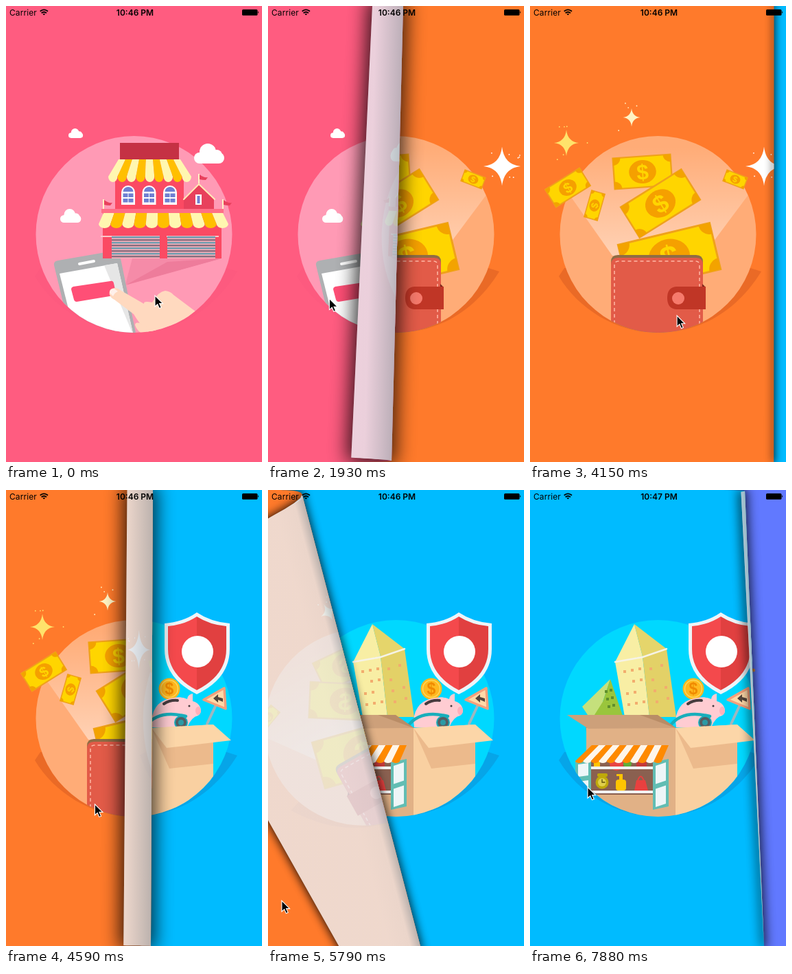
Animation of 373 by 663 pixels, one loop 8000 ms. Source, as an HTML page:

```html
<!DOCTYPE html>
<html lang="en">
<head>
<meta charset="utf-8">
<title>Page curl</title>
<style>
  html, body { margin: 0; width: 100%; height: 100%; overflow: hidden; }
  svg { display: block; width: 100vw; height: 100vh; }
  text { font-family: Inter, "Liberation Sans", sans-serif; }
  .coin { font-family: "Liberation Sans", sans-serif; font-weight: 700; text-anchor: middle; }
</style>
</head>
<body>
<svg viewBox="0 0 373 663">
  <defs>
    <clipPath id="disc"><circle cx="186.5" cy="332" r="143"/></clipPath>
    <clipPath id="frontClip"><polygon id="front"/></clipPath>
    <clipPath id="backClip"><polygon id="back"/></clipPath>
    <linearGradient id="beam" x1="0" y1="362" x2="0" y2="205" gradientUnits="userSpaceOnUse">
      <stop stop-color="#fff" stop-opacity=".45"/><stop offset="1" stop-color="#fff" stop-opacity="0"/>
    </linearGradient>
    <linearGradient id="shade" gradientUnits="userSpaceOnUse">
      <stop stop-color="#707a80" stop-opacity=".42"/>
      <stop offset=".16" stop-color="#707a80" stop-opacity=".24"/>
      <stop offset=".33" stop-color="#707a80" stop-opacity=".06"/>
      <stop offset="1" stop-color="#707a80" stop-opacity=".03"/>
    </linearGradient>
    <g id="art"></g>
  </defs>
  <rect id="nextBg" width="373" height="663"/>
  <use id="nextArt"/>
  <polygon id="castRight" opacity=".75" stroke="#000"/>
  <g clip-path="url(#frontClip)">
    <rect id="bg" width="373" height="663"/>
    <use id="pageArt"/>
    <polygon id="castLeft" opacity=".8" stroke="#000"/>
  </g>
  <g clip-path="url(#backClip)">
    <rect width="373" height="663" fill="#f1f4f9"/>
    <g opacity=".2">
      <rect id="mirrorBg" width="373" height="663"/>
      <use id="mirror"/>
    </g>
    <rect width="373" height="663" fill="url(#shade)"/>
  </g>
  <g id="status">
    <text x="5" y="13.6" font-size="12" letter-spacing=".1">Carrier</text>
    <text id="clock" x="188" y="13.6" font-size="12" font-weight="600" text-anchor="middle"></text>
    <g fill="none" stroke="#000" stroke-width="1.8">
      <path d="M49.7 7.8Q55.3 3 61 7.8M51.7 10.2Q55.3 7.2 59 10.2"/>
      <path d="M55.3 13.6L53.4 11.6Q55.3 10.2 57.2 11.6Z" fill="#000" stroke="none"/>
    </g>
    <rect x="344" y="5" width="22.5" height="8.8" rx="1.6"/>
    <path d="M367.2 7.6q2 1.7 0 3.4z"/>
  </g>
  <path id="cursor" d="M0 0V16L3.8 12.6L6.4 18.6L9.2 17.4L6.6 11.6H11.6Z" stroke="#fff" stroke-width="1.1"/>
</svg>
<script>
const W = 373, H = 663, LOOP = 8000, TICK = 148.3;
const $ = id => document.getElementById(id);
const repeat = (n, fn) => Array.from({ length: n }, (_, i) => fn(i)).join('');
const poly = (fill, points) => `<polygon fill="${fill}" points="${points}"/>`;
const rect = (fill, x, y, w, h, r = 0) =>
  `<rect fill="${fill}" x="${x}" y="${y}" width="${w}" height="${h}" rx="${r}"/>`;
const dot = (fill, x, y, r) => `<circle fill="${fill}" cx="${x}" cy="${y}" r="${r}"/>`;
const path = (fill, d) => `<path fill="${fill}" d="${d}"/>`;
const line = (color, width, d) =>
  `<path fill="none" stroke="${color}" stroke-width="${width}" stroke-linecap="round" d="${d}"/>`;
const inDisc = s => `<g clip-path="url(#disc)">${s}</g>`;
const dollar = (fill, x, y, size) =>
  `<text class="coin" fill="${fill}" x="${x}" y="${y + size * .36}" font-size="${size}">$</text>`;

let seed = 7;
const random = () => (seed = seed * 16807 % 2147483647) / 2147483647;

const base = (fill, shadow, alpha) =>
  `<path fill="${shadow}" opacity="${alpha}" d="M50 381L42 393C70 440 125 475 186 475C245 475 300 446 337 386L318 380Z"/>`
  + dot(fill, 186.5, 332, 143);

const cloud = (x, y, k) => `<g fill="#fff" transform="translate(${x} ${y}) scale(${k})">
  <rect y="13" width="44" height="16" rx="8"/><circle cx="20" cy="12" r="12"/><circle cx="33" cy="17" r="8"/></g>`;

// Striped awning: top and bottom are [left, right, y]
function awning(n, top, bottom, drop, colors) {
  const x = (e, i) => e[0] + (e[1] - e[0]) * i / n;
  const w = (bottom[1] - bottom[0]) / n;
  return repeat(n, i => path(colors[i % 2], `M${x(top, i)} ${top[2]}L${x(top, i + 1)} ${top[2]}
    L${x(bottom, i + 1)} ${bottom[2]}a${w / 2} ${drop} 0 0 1 ${-w} 0z`));
}

const flag = (x, y) => rect('#fff3c4', x - 1, y, 2, 14)
  + path('#e8415c', `M${x + 1} ${y + 1}q6 5 12 4l-3 4q-6 0 -9 -1z`);

const archWindow = x => path('#fff', `M${x} 289V271a10 10 0 0 1 20 0V289z`)
  + path('#6f7fd2', `M${x + 2.5} 270a7.5 7 0 0 1 15 0z`)
  + repeat(4, i => rect('#6f7fd2', x + 2.5 + i % 2 * 8, 272.5 + (i >> 1) * 7.5, 7, 5.5));

const shutter = x => rect('#fbb3bd', x, 334, 70, 33)
  + repeat(8, i => rect(i % 2 ? '#8a6f80' : '#6f9db0', x, 335 + i * 4, 70, 2.5));

const YELLOW = ['#fff7b0', '#ffbf00'];

const store = rect('#c53144', 166, 199, 86, 25)
  + rect('#fb4a63', 159, 245, 100, 50)
  + repeat(3, i => archWindow(168 + i * 30.5))
  + awning(9, [164, 254, 223], [149, 270, 248], 8, YELLOW)
  + flag(281, 244) + poly('#e8415c', '259,295 259,280 281,258 303,280 303,295')
  + line('#ffe9b8', 2.2, 'M259 281L281 259L304 281')
  + rect('#fff', 276, 274, 9, 15) + rect('#6f7fd2', 278.5, 276, 4, 11)
  + flag(142, 281) + flag(316, 281)
  + rect('#fb4a63', 141, 300, 173, 67) + rect('#ff6f86', 139, 295, 178, 6)
  + rect('#fbc7cb', 138, 334, 172, 2) + shutter(154) + shutter(235)
  + rect('#fb4a63', 224, 333, 10, 34)
  + awning(11, [142, 316, 301], [135, 324, 317], 6, YELLOW);

const phone = poly('#f58ba8', '174,405 184,367 314,367') + poly('#ee7c9b', '174,406 235,372 314,367')
  + path('#aeb0b2', 'M70 377Q69 371 76 370L157 356Q164 355 166 362L190 480H95Z')
  + poly('#fff', '78,389 162,374 186,480 101,480')
  + poly('#e6e6e6', '143,377 162,374 186,480')
  + line('#fff', 4, 'M107 375L128 371')
  + path('#ff4f76', 'M95 412Q95 409 98 408L152 400Q156 399 157 403L160 417Q160 420 157 421L103 430Q100 430 99 427Z');

const hand = path('#ffd9bf', `M151 420Q149 411 158 410Q163 410 168 414L201 433Q200 428 213 431
  Q222 415 232 414Q240 415 244 420L276 444L260 480H212Q196 465 186 448L158 427Q153 425 151 420Z`)
  + path('#ffd9bf', 'M188 464Q188 459 195 461L226 474L210 482Q192 476 188 464Z')
  + path('#fff0ea', 'M151 417Q151 410 158 411L163 415Q158 417 156 422Z');

const shopPage = base('#ff9ab5', '#e84a70', .12) + cloud(91, 178, .48) + cloud(79, 295, .69)
  + inDisc(phone + hand) + store + cloud(274, 200, 1);

function bill(x, y, w, h, turn) {
  const q = h * .24;
  const corner = i => `<path fill="#f3a300" transform="scale(${i & 1 ? 1 : -1} ${i & 2 ? 1 : -1})"
    d="M${w / 2} ${h / 2}h${-q}a${q} ${q} 0 0 1 ${q} ${-q}z"/>`;
  return `<g transform="translate(${x} ${y}) rotate(${turn})">
    <rect x="${-w / 2}" y="${-h / 2}" width="${w}" height="${h}" fill="#ffd500" stroke="#efa21a" stroke-width="${1 + h / 35}"/>
    ${repeat(4, corner)}<ellipse rx="${h * .44}" ry="${h * .38}" fill="#f5a000"/>${dollar('#ffd500', 0, 0, h * .7)}</g>`;
}

// Four-pointed star with loose specks around it
const spark = (fill, x, y, r, specks) => `<path fill="${fill}" transform="translate(${x} ${y}) scale(${r})"
  d="M0-1.06Q.1-.1 1 0Q.1.1 0 1.06Q-.1.1-1 0Q-.1-.1 0-1.06Z"/>`
  + repeat(specks, () => {
    const angle = random() * 2 * Math.PI, d = 14 + random() * 18;
    return dot(fill, x + d * Math.cos(angle), y + d * Math.sin(angle), .9);
  });

const wallet = path('#8f6d45', 'M118 372Q118 362 128 362H242Q252 362 252 372V480H118Z')
  + path('#e25b48', 'M118 376Q118 366 128 366H242Q252 366 252 376V480H118Z')
  + '<path fill="none" stroke="#ffb9a6" stroke-width="1.5" stroke-dasharray="5 4" d="M123 480V377Q123 371 129 371H241Q247 371 247 377V480"/>'
  + poly('#7d2218', '251,404 256,409 251,409')
  + path('#c03626', 'M256 408H213Q200 409 200 424.5T213 441H256Z') + dot('#f67a6c', 216, 425, 9);

const moneyPage = base('#ffac77', '#ea6a26', 1)
  + inDisc(path('url(#beam)', 'M120 363L60 278L75 190H300L320 272L252 363Z'))
  + bill(164, 241, 84, 45, -4) + bill(190, 287, 104, 52, -32)
  + bill(203, 365, 137, 69, -13.5) + bill(55, 264, 59, 30, -32)
  + bill(94, 290, 40, 20, -74) + bill(299, 252, 32, 17, 21)
  + inDisc(wallet)
  + spark('#ffe36b', 53, 199, 18, 6) + spark('#fff3c4', 148, 162, 12.5, 4) + spark('#fff', 341, 233, 27, 8);

// Tower windows climb with the slant of their wall
const panes = (cols, x, y, dx, slant, lean) => repeat(cols * 4, i => {
  const c = i % cols, r = i / cols | 0;
  return i % 5 === 3 ? '' : rect('#f2ad6e', x + c * dx + r * lean, y + r * 16 - c * slant, 4, 4);
});

const towers = poly('#f8eea4', '152,195 124,250 164,242') + poly('#e5d56b', '152,195 164,242 199,231')
  + poly('#f8eea4', '124,250 164,242 174,330 138,330') + poly('#e3d167', '164,242 199,231 213,330 174,330')
  + line('#f6f3e6', 2.5, 'M124 250L164 243L199 231')
  + panes(3, 136, 262, 11, 2, 2) + panes(2, 174, 258, 16, 5, 3)
  + poly('#c5e07c', '76,315 117,275 106,308 108,330 86,330') + poly('#9ac53c', '117,275 135,328 92,330 106,308')
  + repeat(6, i => rect('#5f8f2c', 109 + i % 2 * 7 + (i >> 1) * 2, 291 + (i >> 1) * 11 - i % 2 * 2, 4, 4));

const pig = dot('#ffb81f', 238, 289, 15.5)
  + '<circle cx="238" cy="289" r="12.5" fill="none" stroke="#ffd75a" stroke-width="1.5"/>'
  + dollar('#f08a00', 238, 289, 23)
  + path('#ffccd2', 'M212 335Q215 305 245 302Q256 300 264 304Q265 297 272 296L272 307Q280 309 283 316Q286 323 280 328Q270 330 264 345H213Z')
  + line('#473b3f', 4, 'M230 311Q239 305 250 306') + dot('#473b3f', 267, 314, 1.5)
  + '<ellipse cx="280" cy="321" rx="4" ry="6" fill="#ffb0ba"/>'
  + line('#18aebb', 4.5, 'M204 343Q222 319 262 329')
  + dot('#18aebb', 255, 338, 10) + dot('#555e63', 255, 338, 8) + dot('#2c9aa5', 255, 338, 4);

const sign = line('#9db7c0', 4, 'M308 308L293 340')
  + '<path fill="#ffd9a8" stroke="#f3a07c" stroke-width="3.5" stroke-linejoin="round" d="M288 305L318 288L320 318Z"/>'
  + path('#55463c', 'M302 303L309 297V301L316 303V308L309 305V309Z');

const shield = path('#eef4f8', 'M278 178Q299 192 326 194V231Q326 274 278 297Q231 274 231 231V194Q258 192 278 178Z')
  + path('#f4494c', 'M278 184V291Q236 269 236 231V198Q260 196 278 184Z')
  + path('#e14040', 'M278 184Q297 196 321 198V231Q321 269 278 291Z')
  + dot('#fff', 279, 235, 23);

const leftFlap = poly('#cda07a', '54,327 160,327 212,346 85,347');
const rightFlap = poly('#fcd6a8', '212,346 302,341 328,364 234,375');
const carton = poly('#b98c66', '80,327 186,327 213,346 213,352 82,352')
  + poly('#e1b186', '82,346 212,346 212,480 82,480') + poly('#f9d0a1', '212,346 302,341 302,480 212,480')
  + poly('#ecba8c', '212,346 238,405 302,398 302,360');

const sash = (x, y, w, h, slope) => {
  const pane = (fill, gap, top, height) => poly(fill, `${x + gap},${top} ${x + w - gap},${top - slope}
    ${x + w - gap},${top + height - slope} ${x + gap},${top + height}`);
  return pane('#62bdb3', 0, y, h)
    + repeat(2, i => pane('#eef6f8', 4, y + 5 + i * (h / 2 - 1), h / 2 - 8));
};

const kiosk = rect('#8a6050', 88, 385, 92, 58)
  + rect('#ffc400', 93, 393, 9, 9) + dot('#e84545', 126, 398, 10) + dot('#5fae3a', 142, 398, 6) + rect('#c43a3a', 155, 394, 15, 9)
  + rect('#f2f2f2', 88, 402, 92, 4) + rect('#f2f2f2', 88, 437, 92, 4)
  + dot('#bfa90a', 105, 425, 9.5) + rect('#bfa90a', 98, 412, 15, 5, 2) + dot('#e0cf4c', 105, 425, 6) + line('#5d5008', 1.3, 'M105 421V425H109')
  + rect('#ffc400', 125, 421, 15, 16, 4) + rect('#ffc400', 130, 414, 5, 8) + rect('#ffc400', 126, 413, 9, 3)
  + path('#e8403f', 'M152 437L155 422H168L172 437Z') + line('#e8403f', 2, 'M157 423Q161 410 166 423')
  + sash(66, 394, 23, 52, 2) + sash(179, 396, 23, 69, 5)
  + awning(11, [90, 202, 371], [66, 192, 394], 3, ['#ff8a00', '#fff6ea']);

const boxPage = base('#00d8ff', '#06a5e8', 1) + towers + pig + sign
  + inDisc(carton) + leftFlap + rightFlap + inDisc(kiosk) + shield;

const pages = [
  ['#ff5c80', shopPage], ['#ff7a2b', moneyPage], ['#00bbff', boxPage],
  ['#6179ff', dot('#d98a4a', 325.5, 262, 2.5)]
];
$('art').outerHTML = pages.map((p, i) => `<g id="page${i}">${p[1]}</g>`).join('');

const mix = (a, b, u) => a + (b - a) * u;

// Each turn begins flat at the right edge and passes through fold poses {t, top, bottom}
const pose = (t, top, bottom) => ({ t, top, bottom });
const turns = [
  [pose(8, W, W), pose(13, 197, 180), pose(18, -120, 0)],
  [pose(27, W, W), pose(31, 214, 211), pose(35, 134, 175), pose(39, 48, 222), pose(40, -120, 0)],
  [pose(51, W, W), pose(53, 313, 341), pose(58, 197, 180)]
];
const ends = turn => turn[turn.length - 1].t;

function foldAt(turn, n) {
  const i = turn.findIndex(p => p.t >= n), p = turn[i - 1], q = turn[i];
  const u = ((n - p.t) / (q.t - p.t)) ** 1.6;
  return [mix(p.top, q.top, u), mix(p.bottom, q.bottom, u)];
}

// Pointer strokes: x slows down while y picks up speed
const strokes = [
  { from: 8, to: 18, x: 38, y: 453 }, { from: 19, to: 23, x: 247, y: 450 },
  { from: 27, to: 39, x: 20, y: 597 }, { from: 42, to: 47, x: 287, y: 413 },
  { from: 51, to: 53, x: 84, y: 432 }
];

const pointerAt = n => strokes.reduce(([x, y], s) => {
  const u = Math.min(1, Math.max(0, (n - s.from) / (s.to - s.from)));
  return [mix(x, s.x, 1 - (1 - u) ** 1.8), mix(y, s.y, u ** 2.8)];
}, [217, 421]);

// Sheet wound over a cylinder of radius R whose silhouette is the fold line
function curlShape([a, b]) {
  const R = 8.9 * Math.sqrt(W - (a + b) / 2) * (1 - ((b - a) / 210) ** 2);
  const len = Math.hypot(H, b - a), nx = H / len, ny = (a - b) / len;
  const half = Math.PI * R / 2, s0 = R - a * nx;
  const dist = (x, y) => x * nx + y * ny + s0;
  const wrap = s => s < 0 ? s : s < 2 * half ? R * Math.sin(s / R) : 2 * half - s;
  const edge = (from, to, y) => Array.from({ length: 17 }, (_, i) => {
    const x = mix(from, to, i / 16), s = dist(x, y), d = wrap(s) - s;
    return [x + d * nx, y + d * ny];
  });
  const clamp = x => Math.min(W, Math.max(0, x));
  const top = clamp(a + (half - R) / nx), bottom = clamp(b + (half - R) / nx);

  // Back print: a reflection squeezed to fit the visible part of the roll
  const far = Math.max(dist(W, 0), dist(W, H), half + 1), mid = (half + far) / 2;
  const k = (wrap(mid) - wrap(far)) / (far - mid);
  const B = -k - 1, shift = wrap(mid) + k * mid + B * s0;
  return {
    R,
    front: [...edge(0, top, 0), ...edge(bottom, 0, H)].join(' '),
    back: [...edge(top, W, 0), ...edge(W, bottom, H)].join(' '),
    matrix: `matrix(${[1 + B * nx * nx, B * nx * ny, B * nx * ny, 1 + B * ny * ny, nx * shift, ny * shift]})`,
    shade: { x1: a, y1: 0, x2: a - nx * R, y2: -ny * R }
  };
}

const set = (id, attrs) => { for (const k in attrs) $(id).setAttribute(k, attrs[k]); };

function showCurl(turn, page, n) {
  const c = curlShape(foldAt(turn, n));
  set('front', { points: c.front });
  set('back', { points: c.back });
  set('castRight', { points: c.front, 'stroke-width': c.R * .1 });
  set('castLeft', { points: c.back, 'stroke-width': c.R * .1 });
  $('castRight').style.filter = $('castLeft').style.filter = `blur(${2 + c.R * .1}px)`;
  set('mirrorBg', { fill: pages[page][0], transform: c.matrix });
  set('mirror', { href: '#page' + page, transform: c.matrix });
  set('shade', c.shade);
  set('nextBg', { fill: pages[page + 1][0] });
  set('nextArt', { href: '#page' + (page + 1) });
}

function draw(n) {
  const page = turns.filter(t => n >= ends(t)).length;
  const turn = turns.find(t => n > t[0].t && n < ends(t));
  set('bg', { fill: pages[page][0] });
  set('pageArt', { href: '#page' + page });
  if (turn) showCurl(turn, page, n);
  else {
    set('front', { points: `0,0 ${W},0 ${W},${H} 0,${H}` });
    for (const id of ['back', 'castLeft', 'castRight']) set(id, { points: '' });
  }
  set('cursor', { transform: `translate(${pointerAt(n)})` });
  $('clock').textContent = n < 49 ? '10:46 PM' : '10:47 PM';
}

const start = performance.now();
let last = -1;
function frame() {
  const n = Math.floor((performance.now() - start) % LOOP / TICK + .05);
  if (n !== last) draw(last = n);
  requestAnimationFrame(frame);
}
frame();
</script>
</body>
</html>
```
